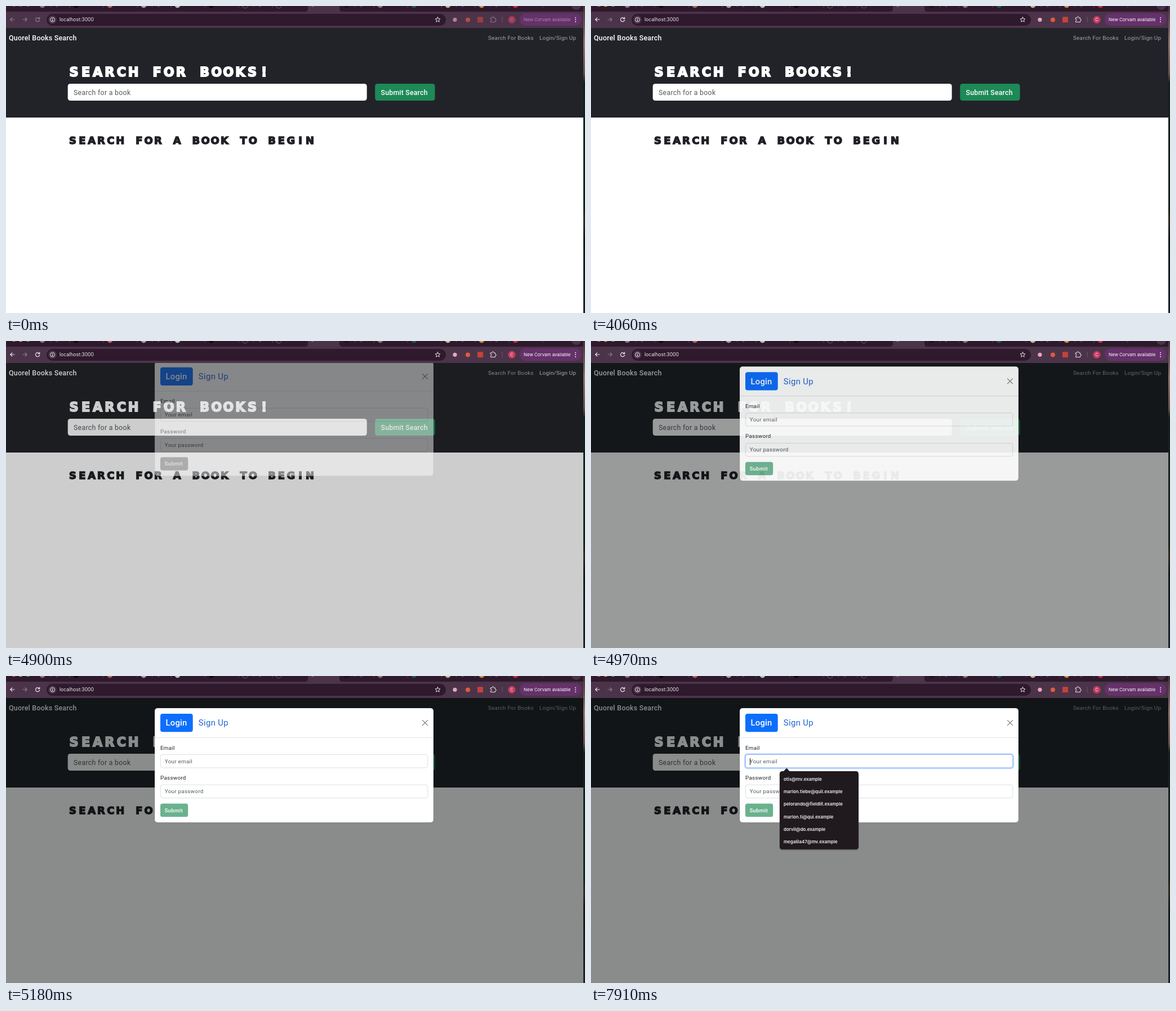
An HTML page for the animation above (8 s loop, 1028 by 545 pixels).

```html
<!DOCTYPE html>
<html lang="en">
<head>
<meta charset="utf-8">
<title>Book search login</title>
<style>
  html, body { margin: 0; width: 100%; height: 100%; overflow: hidden; background: #fff; }
  svg { display: block; width: 100%; height: 100%; }
  text { font-family: Roboto, sans-serif; letter-spacing: .025em; white-space: pre; }
  .medium { font-weight: 500; letter-spacing: .015em; }
  .ui { font-family: Inter, sans-serif; letter-spacing: 0; }
  .block { font-family: "DejaVu Sans", sans-serif; font-weight: 700; letter-spacing: 0; text-anchor: middle; stroke-linejoin: miter; }
  .line { fill: none; stroke-width: 1.2; stroke-linecap: round; stroke-linejoin: round; }
  #window { --icon: #8d7b8c; --label: #a58ca8; --ext: .68; }
  #window.active { --icon: #eee4ec; --label: #fff; --ext: 1; }
  .icon { stroke: var(--icon); }
  .ext { opacity: var(--ext); }
</style>
</head>
<body>
<svg viewBox="0 0 1028 545" preserveAspectRatio="none">
  <defs>
    <linearGradient id="desktop" x2="0" y2="1">
      <stop offset="0" stop-color="#4a3440"/>
      <stop offset=".12" stop-color="#94766c"/>
      <stop offset=".22" stop-color="#6b514b"/>
      <stop offset=".25" stop-color="#13201e"/>
      <stop offset=".66" stop-color="#14231c"/>
      <stop offset=".7" stop-color="#33281c"/>
      <stop offset=".76" stop-color="#101a19"/>
      <stop offset="1" stop-color="#17222a"/>
    </linearGradient>
    <clipPath id="viewport"><rect y="39" width="1025" height="506"/></clipPath>
  </defs>
  <g id="window">
    <rect width="1028" height="545" fill="url(#desktop)"/>
    <g id="page" clip-path="url(#viewport)"></g>
    <g id="browser"></g>
  </g>
</svg>
<script>
const LOOP = 8000;
const $ = id => document.getElementById(id);

function add(parent, tag, attrs = {}, content = '') {
  const node = document.createElementNS('http://www.w3.org/2000/svg', tag);
  for (const key in attrs) node.setAttribute(key, attrs[key]);
  node.textContent = content;
  return parent.appendChild(node);
}
const rect = (p, x, y, width, height, fill, rx = 0, more = {}) =>
  add(p, 'rect', { x, y, width, height, fill, rx, ...more });
const circle = (p, cx, cy, r, fill, more = {}) => add(p, 'circle', { cx, cy, r, fill, ...more });
const path = (p, d, more = {}) => add(p, 'path', { d, class: 'line', ...more });
const text = (p, x, y, size, fill, content, more = {}) =>
  add(p, 'text', { x, y, 'font-size': size, fill, ...more }, content);

// Heavy display type: one letter centred in each equal cell, thickened by a stroke.
function blockText(p, x, y, size, cell, fill, content) {
  const xs = [...content].map((_, i) => (x + cell * (i + .5)).toFixed(2)).join(' ');
  text(p, xs, y, size, fill, content, { class: 'block', stroke: fill, 'stroke-width': size * .085 });
}

function buildBrowser(g) {
  const bar = '#4b3449', strip = '#2e1a2c';
  rect(g, 0, 0, 1025, 11, strip);
  rect(g, 0, 10, 1025, 29, bar);
  path(g, 'M531 10Q536 10 536 5V0H592V5Q592 10 597 10Z', { style: `fill:${bar}` });

  const lights = [14, 26, 39].map(x => circle(g, x, -2.8, 4, '#6a5768'));
  const icons = ['#8d7089', '#0b090b', '#b9605f', '#a79fa7', '#b4c0bd', '#0b090b', '', '', '#a2509a',
    '#1a131d', '#8a7468', '#1e5a4e', '#c4b58a', '#d08a3a', '#c92b3c'];
  icons.forEach((fill, i) => {
    const x = 64.5 + 60 * i;
    if (fill) circle(g, x, -1.4, i === 8 ? 3 : 4.8, fill);
    else circle(g, x, -1.2, 5, 'none', { stroke: '#94848f', 'stroke-dasharray': '2 1' });
    if (i !== 7 && i !== 8) rect(g, x + 48, 0, 1, 3, '#5a4558');
    if (i % 3 === 0 || i === 13) text(g, x + 14, 0, 8, '#8f7f8e', 'page', { class: 'ui' });
  });
  circle(g, 1012.5, -1.5, 8.5, '#4b3449');

  rect(g, 72, 14, 709, 21, strip, 10.5);
  path(g, 'M15 24H8M11 20.8L7.8 24L11 27.2', { class: 'line icon' });
  path(g, 'M30 24H37M34 20.8L37.2 24L34 27.2', { stroke: '#8d7b8c' });
  path(g, 'M59 22A3.6 3.6 0 1 0 59.6 25M59.7 20V22.7H57', { class: 'line icon' });
  circle(g, 82.5, 24.3, 7.2, '#49344a');
  circle(g, 82.5, 24.3, 3.9, 'none', { stroke: '#eee4ec' });
  path(g, 'M82.5 24V26.3M82.5 22.3V22.4', { stroke: '#eee4ec' });
  text(g, 95, 27.3, 8.65, '#f1e8f0', 'localhost:3000', { class: 'ui' });

  const star = Array.from({ length: 10 }, (_, i) => {
    const r = i % 2 ? 2.1 : 4.7, a = Math.PI * (i / 5 - .5);
    return `${(766.5 + r * Math.cos(a)).toFixed(2)} ${(24.4 + r * Math.sin(a)).toFixed(2)}`;
  });
  path(g, `M${star.join('L')}Z`, { stroke: '#eee4ec', style: 'stroke-width:1' });

  const ext = add(g, 'g', { class: 'ext' });
  circle(ext, 797, 24.3, 3.6, '#e8a5bd');
  circle(ext, 820, 24.5, 4, '#e05a3c');
  rect(ext, 837, 19.3, 10, 10, '#c4423a', 1);
  path(g, 'M860.5 21H863Q862.8 18.8 864.6 18.8T866.2 21H868.5V23.4Q870.3 23.4 870.3 25T868.5 26.6V28.6H860.5V26.4Q862.3 26.2 862.3 24.8T860.5 23.3Z',
    { class: 'line icon', style: 'stroke-width:1' });
  rect(g, 880.5, 19, 1, 10, '#6f566d');
  circle(ext, 898, 24.3, 6.6, '#c93a62');
  text(g, 898, 27, 7.4, 'var(--label)', 'C', { class: 'ui', 'text-anchor': 'middle' });

  rect(g, 912, 13, 109.5, 22, '#65316a', 11);
  text(g, 919, 27.2, 7.9, 'var(--label)', 'New Corvam available', { class: 'ui' });
  [20.7, 24.3, 27.9].forEach(y => circle(g, 1011.2, y, 1, '#f3eaf2'));
  return lights;
}

function buildPage(g) {
  rect(g, 0, 39, 1025, 506, '#fff');
  rect(g, 0, 39, 1025, 159, '#222329');
  text(g, 5, 60.8, 12.5, '#fff', 'Quorel Books Search', { class: 'medium' });
  text(g, 856, 59.6, 9.87, '#a6a6a9', 'Search For Books');
  const login = text(g, 947, 59.6, 9.9, '#a6a6a9', 'Login/Sign Up');

  blockText(g, 110, 125.4, 22.4, 21.1, '#fff', 'SEARCH FOR BOOKS!');
  rect(g, 109.7, 138, 531, 30, '#fff', 4.5);
  text(g, 120, 157.6, 12.3, '#55585d', 'Search for a book');
  rect(g, 655.2, 138, 106.4, 30, '#1d8956', 4.5);
  text(g, 665.6, 157.6, 12.35, '#fff', 'Submit Search', { class: 'medium' });
  blockText(g, 110, 245.1, 17.9, 16.84, '#1f2126', 'SEARCH FOR A BOOK TO BEGIN');

  const shade = rect(g, 0, 39, 1025, 506, '#000503');
  return { login, shade };
}

function buildModal(g) {
  const field = (y, label, hint) => {
    text(g, 274, y - 9, 9.9, '#212529', label);
    const box = rect(g, 274.3, y, 474.5, 23.4, '#fff', 3.7, { stroke: '#dcdfe3' });
    text(g, 281.8, y + 15, 9.9, '#565b61', hint);
    return box;
  };
  rect(g, 264, 57, 495, 203, '#fff', 5, { stroke: '#000', 'stroke-opacity': .18, 'stroke-width': .7 });
  rect(g, 264, 109, 495, .8, '#d9dce0');
  rect(g, 274, 67, 57.7, 32.2, '#0d6efd', 4);
  text(g, 283.4, 88.4, 14.9, '#fff', 'Login', { class: 'medium' });
  text(g, 341.8, 88.4, 14.86, '#1f64d3', 'Sign Up');
  path(g, 'M739.5 78.7L748.5 87.7M748.5 78.7L739.5 87.7', { stroke: '#777' });
  const ring = rect(g, 273, 138.3, 477, 25.8, 'none', 5, { stroke: '#c2d9fe', 'stroke-width': 2.5 });
  const email = field(139.5, 'Email', 'Your email');
  field(193.2, 'Password', 'Your password');
  const submit = rect(g, 274, 226.5, 49.2, 23.6, '#6ab28e', 3.7);
  text(g, 281.5, 241.6, 9.9, '#fff', 'Submit', { class: 'medium' });
  const caret = rect(g, 282, 146, 1, 12, '#111');
  return { ring, email, submit, caret };
}

function buildSuggestions(g) {
  rect(g, 334.5, 169.5, 141, 140, '#000', 5, { opacity: .22 });
  path(g, 'M341.5 169.5L347.3 163.5L353 169.5Z', { style: 'fill:#201a1f' });
  rect(g, 335, 169, 140, 138.7, '#201a1f', 4.5);
  ['otis@mv.example', 'marlon.tiebe@quil.example', 'pelorando@fieldlit.example',
    'marlon.ti@qui.example', 'dorvil@do.example', 'megalila47@mv.example'
  ].forEach((mail, i) =>
    text(g, 342, 185.6 + 22.35 * i, 7.9, '#f2eef1', mail, { class: 'ui', 'font-weight': 600 }));
}

const lights = buildBrowser($('browser'));
const { login, shade } = buildPage($('page'));
const modal = add($('page'), 'g');
const { ring, email, submit, caret } = buildModal(modal);
const list = add($('page'), 'g');
buildSuggestions(list);

// Each row: start time, then the values that change from there on.
const steps = [
  [0, { active: 0, hover: 0, shade: 0, modal: 0, drop: -31, submit: 1, focus: 0, list: 0, caret: 0 }],
  [4060, { active: 1 }],
  [4200, { hover: .5 }],
  [4270, { hover: 1 }],
  [4900, { shade: .2, modal: .47, drop: -20.3, submit: 0 }],
  [4970, { shade: .4, modal: .91, drop: -11.8, submit: 1, hover: 0 }],
  [5040, { shade: .46, modal: 1, drop: -4.5 }],
  [5110, { drop: -.8 }],
  [5180, { drop: 0 }],
  [6860, { focus: .35, caret: 1 }],
  [6930, { focus: .8 }],
  [7000, { focus: 1, list: 1 }],
  [7350, { caret: 0 }],
  [7910, { caret: 1 }]
];
const mix = (a, b, k) => `rgb(${a.map((v, i) => Math.round(v + (b[i] - v) * k))})`;

function draw(t) {
  const s = Object.assign({}, ...steps.filter(([start]) => start <= t).map(([, values]) => values));
  $('window').classList.toggle('active', !!s.active);
  lights.forEach((dot, i) => dot.setAttribute('fill', s.active ? ['#f45b54', '#f5bd3c', '#38c149'][i] : '#6a5768'));
  login.setAttribute('fill', mix([166, 166, 169], [211, 211, 212], s.hover));
  shade.setAttribute('opacity', s.shade);
  modal.setAttribute('opacity', s.modal);
  modal.setAttribute('transform', `translate(0 ${s.drop})`);
  submit.setAttribute('fill', s.submit ? '#6ab28e' : '#888');
  ring.setAttribute('opacity', s.focus);
  email.setAttribute('stroke', mix([220, 223, 227], [134, 175, 250], s.focus));
  caret.setAttribute('opacity', s.caret);
  list.setAttribute('opacity', s.list);
}

const begin = performance.now();
function tick() {
  draw((performance.now() - begin) % LOOP);
  requestAnimationFrame(tick);
}
tick();
</script>
</body>
</html>
```
